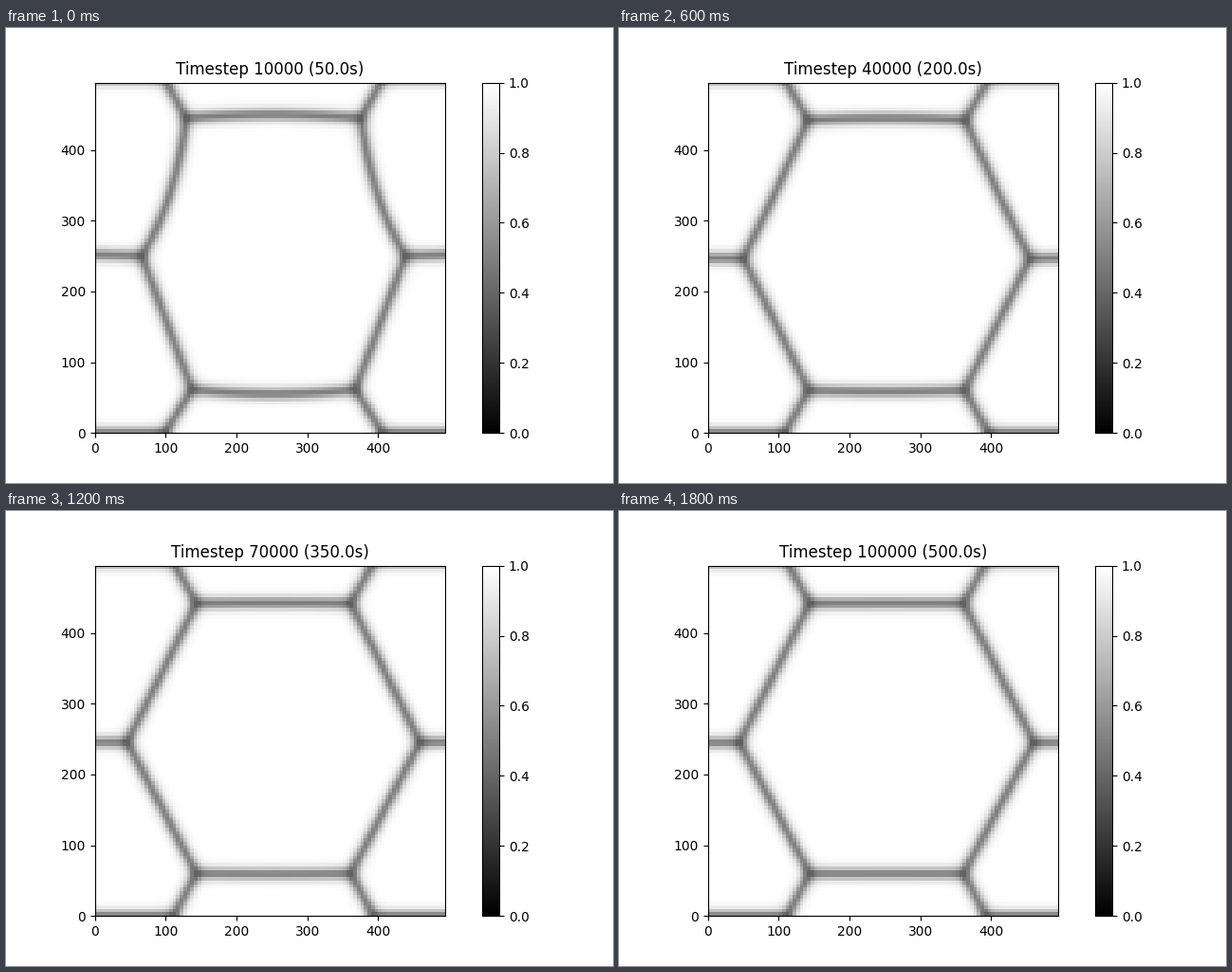
Write a matplotlib script that moves like this. It is 640 px wide and 480 px high and loops after 2 s.

```python
import numpy as np
import matplotlib.pyplot as plt
from matplotlib.animation import FuncAnimation

W, H = 640, 480
FRAMES, INTERVAL = 10, 200
N, STEP = 99, 5                       # cells per side, units per cell
LEFT, BOTTOM, SIZE = 93.6, 427.2, 369.6
CELL = SIZE / N
CENTER = 50                           # column of the mirror axis
WIDTH = 1.6                           # wall half-width in cells


def cell(px, py):
    """Stage pixels to (distance from the mirror axis, height) in cells."""
    return np.array([CENTER + 0.5 - (px - LEFT) / CELL, (BOTTOM - py) / CELL])


def bezier(p0, ctrl, p1, n=14):
    t = np.linspace(0, 1, n)[:, None]
    return (1 - t) ** 2 * p0 + 2 * t * (1 - t) * ctrl + t ** 2 * p1


def line(p0, p1):
    return np.array([p0, p1], float)


def cap(end, bow):
    """Half of a horizontal wall, bowed by a parabola around the axis."""
    y = end[1] + bow
    return bezier(np.array([0, y]), np.array([end[0] / 2, y]), end)


def walls(i):
    """Grain boundaries relaxing towards a hexagon."""
    top = cell(201 - 11 * 0.55 ** i, 97.6 - 2.4 * 0.6 ** i)
    side = cell(126.5 + 16.5 * 0.65 ** i, 244.2 - 3.8 * 0.7 ** i)
    low = cell(201 - 5 * 0.6 ** i, 382.4 - 1.2 * 0.65 ** i)
    outer = CENTER + 0.5 - (177.5 - 10 * 0.65 ** i - LEFT) / CELL
    top_bow = 3.8 / (1 + (i / 3) ** 3) / CELL
    low_bow = -4.8 * 0.65 ** i / CELL
    sag = 8.5 * 0.52 ** i / CELL
    bend = top + 0.6 * (side - top) - [2 * sag, 0]
    edge = [54, side[1] + 1.6 * 0.5 ** i / CELL]
    return [
        cap(top, top_bow),
        cap(low, low_bow),
        bezier(top, bend, side),
        line(low, side),
        line(side, edge),
        line(low, [outer, 0]),
        line(top, [outer, 100]),
        line([outer, 0], [54, 0]),
        line([outer, 100], [54, 100]),
    ]


def distance(x, y, path):
    best = np.full(x.shape, np.inf)
    for (ax_, ay), (bx, by) in zip(path[:-1], path[1:]):
        dx, dy = bx - ax_, by - ay
        t = ((x - ax_) * dx + (y - ay) * dy) / (dx * dx + dy * dy)
        t = np.clip(t, 0, 1)
        best = np.minimum(best, np.hypot(x - ax_ - t * dx, y - ay - t * dy))
    return best


half_x, half_y = np.meshgrid(np.arange(CENTER + 1.0), np.arange(N) + 0.5)
mirror = np.abs(np.arange(N) - CENTER)


def field(i):
    """Sum of squared grain phases; only the two nearest walls matter."""
    d = np.sort([distance(half_x, half_y, p) for p in walls(i)], axis=0)
    a, b = np.exp(-2 * d[:2] / WIDTH)
    value = (1 + a * a + b * b) / (1 + a + b) ** 2
    return np.maximum(value, 0.38)[:, mirror]


def title(i):
    n = i + 1
    return f"Timestep {n * 10000} ({n * 50.0:.1f}s)"


fig = plt.figure(figsize=(W / 100, H / 100), dpi=100)
ax = fig.add_axes([LEFT / W, 0.11, SIZE / W, 0.77])
cax = fig.add_axes([501.6 / W, 0.11, 18.48 / W, 0.77])

grid = np.arange(N + 1) * STEP
fields = [field(i) for i in range(FRAMES)]
mesh = ax.pcolormesh(grid, grid, fields[0], cmap="gray", vmin=0, vmax=1)
ax.set_xticks(range(0, 500, 100))
ax.set_yticks(range(0, 500, 100))
ax.set_xlim(0, N * STEP)
ax.set_ylim(0, N * STEP)
heading = ax.set_title(title(0))
fig.colorbar(mesh, cax=cax)


def update(i):
    mesh.set_array(fields[i])
    heading.set_text(title(i))
    return mesh, heading


anim = FuncAnimation(fig, update, frames=FRAMES, interval=INTERVAL,
                     init_func=lambda: update(0), repeat=True, repeat_delay=0)
plt.show()
```
